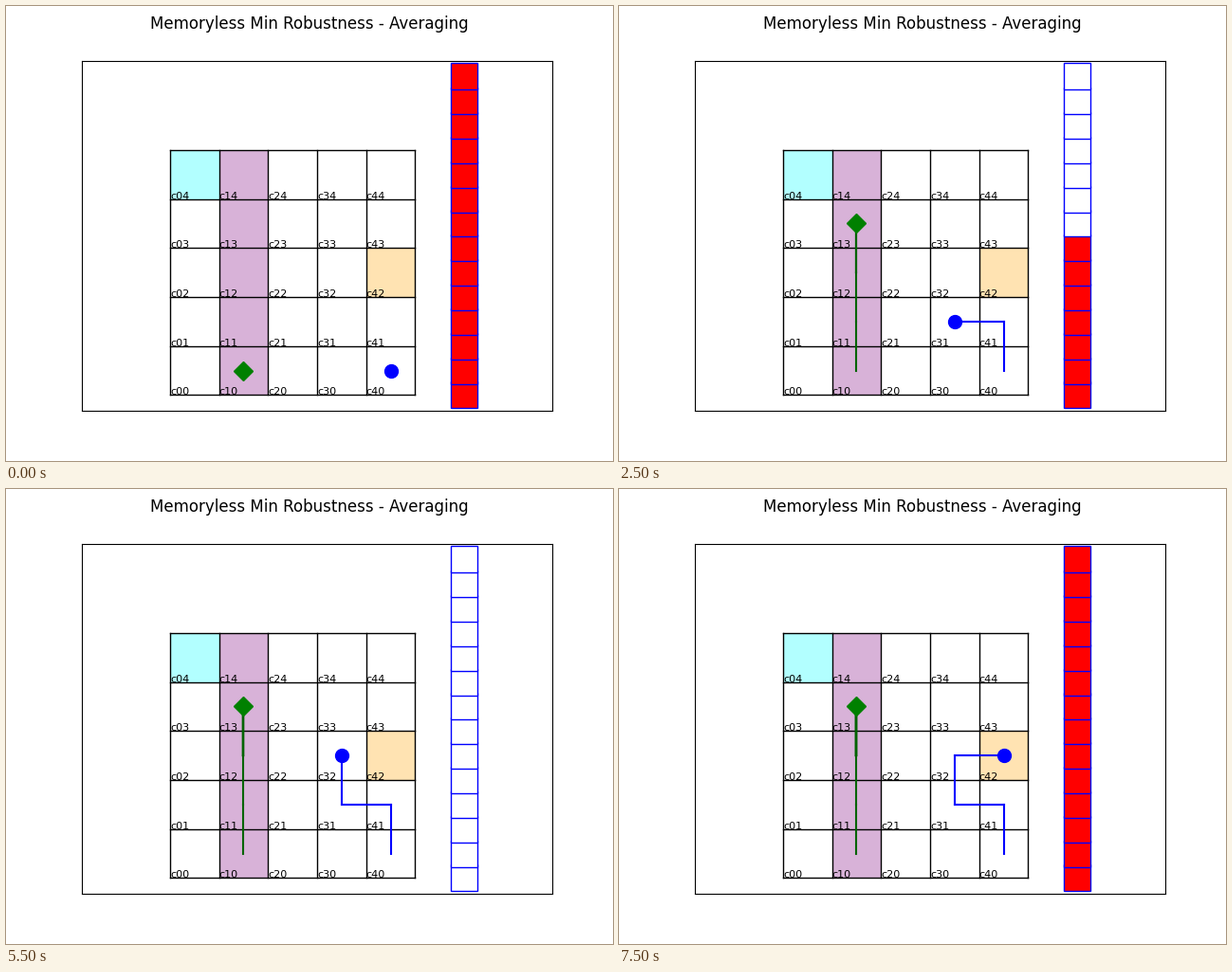
Animation of 640 by 480 pixels, one loop 8000 ms. Source, as a matplotlib script:

```python
import matplotlib.pyplot as plt
from matplotlib.animation import FuncAnimation
from matplotlib.patches import Rectangle

SIZE = 5
CAPACITY = 14
CHARGER = (4, 2)
STEPS = 16

# Cell visited by each robot at every step
blue_path = [(4, 0), (4, 1)] + [(3, 1)] * 8 + [(3, 2)] * 2 + [CHARGER] * 4
green_path = [(1, k if k < 3 else 2 + k % 2) for k in range(STEPS)]


def battery_levels(path):
    """Moving costs two units, waiting one; the charger refills everything."""
    levels = [CAPACITY]
    for prev, cell in zip(path, path[1:]):
        cost = 1 if prev == cell else 2
        levels.append(CAPACITY if cell == CHARGER else max(levels[-1] - cost, 0))
    return levels


def center(cell):
    return cell[0] + 0.5, cell[1] + 0.5


levels = battery_levels(blue_path)

fig, ax = plt.subplots(figsize=(6.4, 4.8), dpi=100)
fig.suptitle("Memoryless Min Robustness - Averaging")
ax.set_xticks([])
ax.set_yticks([])

# Equal scaling, centred on x = 3
y_low, y_high = -0.325, 6.825
half_width = (y_high - y_low) * 496 / 369.6 / 2
ax.set_xlim(3 - half_width, 3 + half_width)
ax.set_ylim(y_low, y_high)


def shade(cell, color, height=1):
    ax.add_patch(Rectangle(cell, 1, height, facecolor=color, alpha=0.3, lw=0))


shade((0, 4), "cyan")
shade((1, 0), "purple", SIZE)
shade(CHARGER, "orange")

for k in range(SIZE + 1):
    ax.plot([k, k], [0, SIZE], color="black", lw=1)
    ax.plot([0, SIZE], [k, k], color="black", lw=1)
for col in range(SIZE):
    for row in range(SIZE):
        ax.text(col, row, f"c{col}{row}", fontsize=8)


class Robot:
    def __init__(self, path, color, trail_color, marker):
        self.path = path
        self.trail = []
        for k in range(1, len(path)):
            if path[k] != path[k - 1]:
                xs, ys = zip(center(path[k - 1]), center(path[k]))
                line, = ax.plot(xs, ys, color=trail_color, lw=1.5, zorder=2.2)
                self.trail.append((k, line))
        self.dot, = ax.plot([], [], marker, color=color, ms=10, zorder=2.5)

    def show(self, step):
        x, y = center(self.path[step])
        self.dot.set_data([x], [y])
        for k, line in self.trail:
            line.set_visible(k <= step)


robots = [
    Robot(green_path, "green", "darkgreen", "D"),
    Robot(blue_path, "blue", "blue", "o"),
]
bars = [
    ax.plot([6], [k / 2], "s", ms=20, mec="blue", mfc="red")[0]
    for k in range(CAPACITY)
]


def update(step):
    for robot in robots:
        robot.show(step)
    for k, bar in enumerate(bars):
        bar.set_markerfacecolor("red" if k < levels[step] else "white")
    return []


anim = FuncAnimation(fig, update, frames=STEPS, interval=500,
                     init_func=lambda: update(0), repeat=True, repeat_delay=0)
plt.show()
```
